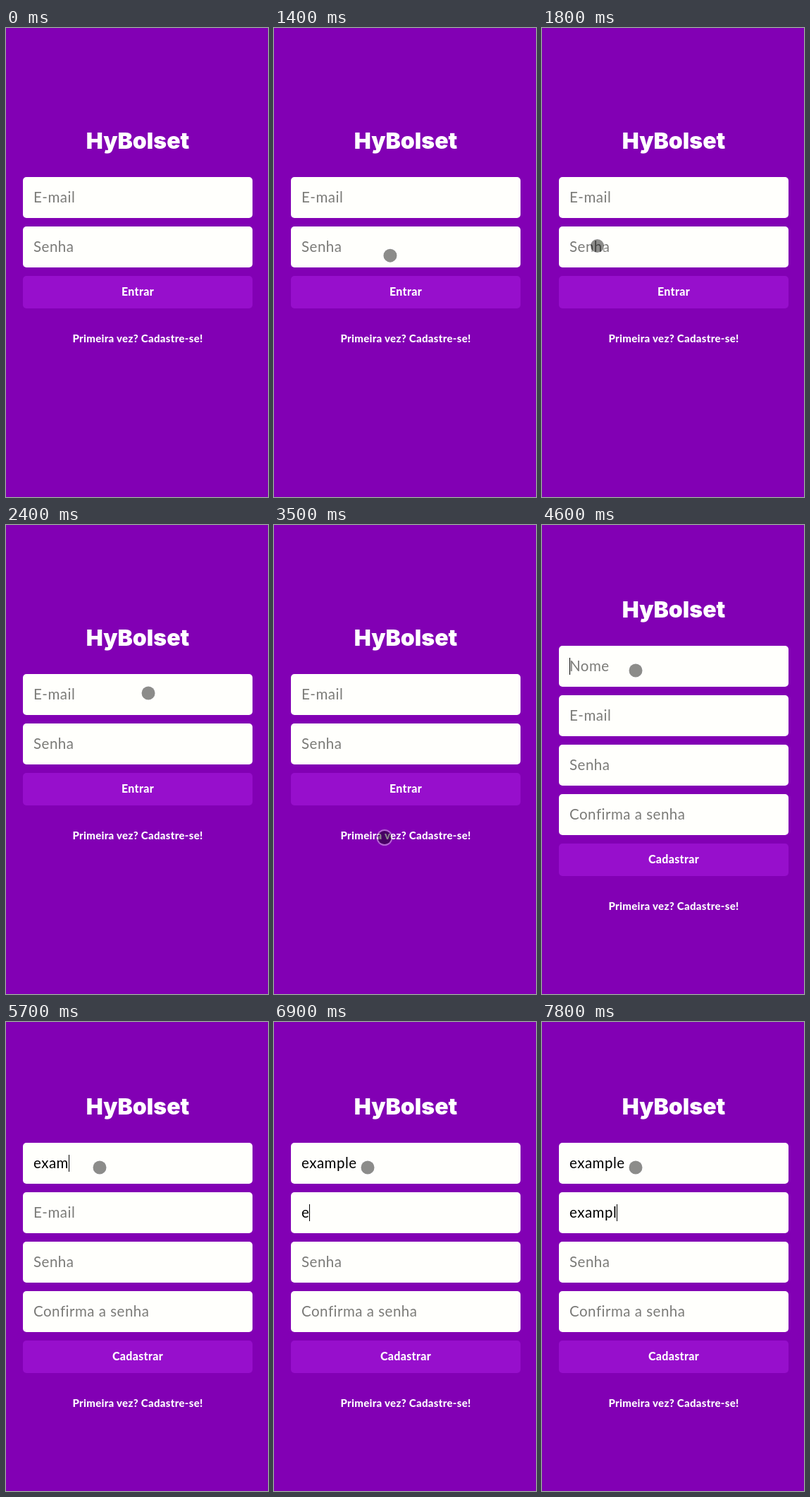
An HTML page for the animation above (8000 ms loop, 372 by 664 pixels).

```html
<!DOCTYPE html>
<html lang="pt-BR">
<head>
<meta charset="utf-8">
<title>Cadastro</title>
<style>
  html, body { margin: 0; width: 100%; height: 100%; overflow: hidden; background: #8200b4; }
  #form { position: absolute; left: 24px; width: 326px; font-family: Lato, sans-serif; }
  h1 { position: absolute; top: -71px; width: 100%; margin: 0; text-align: center;
       font: 900 32px/40px Inter, sans-serif; color: #fff; }
  .field { position: relative; height: 58px; margin-bottom: 12px; padding-left: 15px; box-sizing: border-box;
           border-radius: 5px; background: #fffffc; font-size: 20.5px; line-height: 57px;
           letter-spacing: .5px; white-space: nowrap; color: #000; }
  .hint { color: #7b7b78; }
  .caret { position: absolute; top: 17px; width: 1px; height: 24px; background: #000; }
  #button, #link { text-align: center; font-weight: 800; letter-spacing: .3px; color: #fff; }
  #button { height: 46px; border-radius: 5px; background: #970fcc; font-size: 16px; line-height: 44px; }
  #link { margin-top: 32px; font-size: 15px; line-height: 20px; }
  #touch { position: absolute; left: -9.5px; top: -9.5px; width: 19px; height: 19px; border-radius: 50%;
           background: rgba(0, 0, 0, .45); box-shadow: 0 0 0 2px rgba(255, 255, 255, .4); }
</style>
</head>
<body>
<div id="form">
  <h1>HyBolset</h1>
  <div id="fields"></div>
  <div id="button"></div>
  <div id="link">Primeira vez? Cadastre-se!</div>
</div>
<div id="touch"></div>
<script>
const LOOP = 8000, TICK = 100;
const APPEAR = 800, SIGN_UP = 3700, FOCUS = 4600, NEXT_FIELD = 6400;
const START = [97, 224];
// Each leg continues from the previous end; without bends it is a straight eased move.
const legs = [
  { from: 700, until: 1100, to: [165, 267] },
  { from: 1200, until: 1800, to: [78, 308], bends: [[196, 305], [115, 430]] },
  { from: 1900, until: 2600, to: [172, 326], bends: [[46, 200], [295, 175]] },
  { from: 2700, until: 3000, to: [162.5, 430] },
  { from: 3400, until: 3500, to: [156.5, 442] },
  { from: 3800, until: 4300, to: [132.5, 205.5] }
];
const $ = id => document.getElementById(id);

const bezier = (a, b, c, d, u) => {
  const v = 1 - u;
  return v * v * v * a + 3 * v * v * u * b + 3 * v * u * u * c + u * u * u * d;
};

function pointerAt(t) {
  let point = START;
  for (const { from, until, to, bends = [point, to] } of legs) {
    if (t < from) break;
    const u = Math.min(1, (t - from) / (until - from));
    point = point.map((p, axis) => bezier(p, bends[0][axis], bends[1][axis], to[axis], u));
  }
  return point;
}

const typed = (t, start, interval) =>
  'example'.slice(0, Math.max(0, Math.floor((t - start) / interval) + 1));

const field = (hint, value = '', focused = false) => `<div class="field">${value}` +
  (focused ? '<i class="caret"></i>' : '') +
  (value ? '' : `<span class="hint">${hint}</span>`) + '</div>';

function fieldsAt(t) {
  if (t < SIGN_UP) return field('E-mail') + field('Senha');
  return field('Nome', typed(t, 5250, 150), t >= FOCUS && t < NEXT_FIELD) +
    field('E-mail', typed(t, 6850, 190), t >= NEXT_FIELD) +
    field('Senha') + field('Confirma a senha');
}

let shown = '';
function draw() {
  // The screen refreshes ten times a second
  const t = Math.floor(performance.now() % LOOP / TICK) * TICK;
  const html = fieldsAt(t);
  if (html !== shown) $('fields').innerHTML = shown = html;
  $('form').style.top = (t < SIGN_UP ? 211 : 171) + 'px';
  $('button').textContent = t < SIGN_UP ? 'Entrar' : 'Cadastrar';

  const [x, y] = pointerAt(t);
  $('touch').style.display = t < APPEAR ? 'none' : 'block';
  $('touch').style.transform = `translate(${x}px, ${y}px)`;
  requestAnimationFrame(draw);
}
draw();
</script>
</body>
</html>
```
